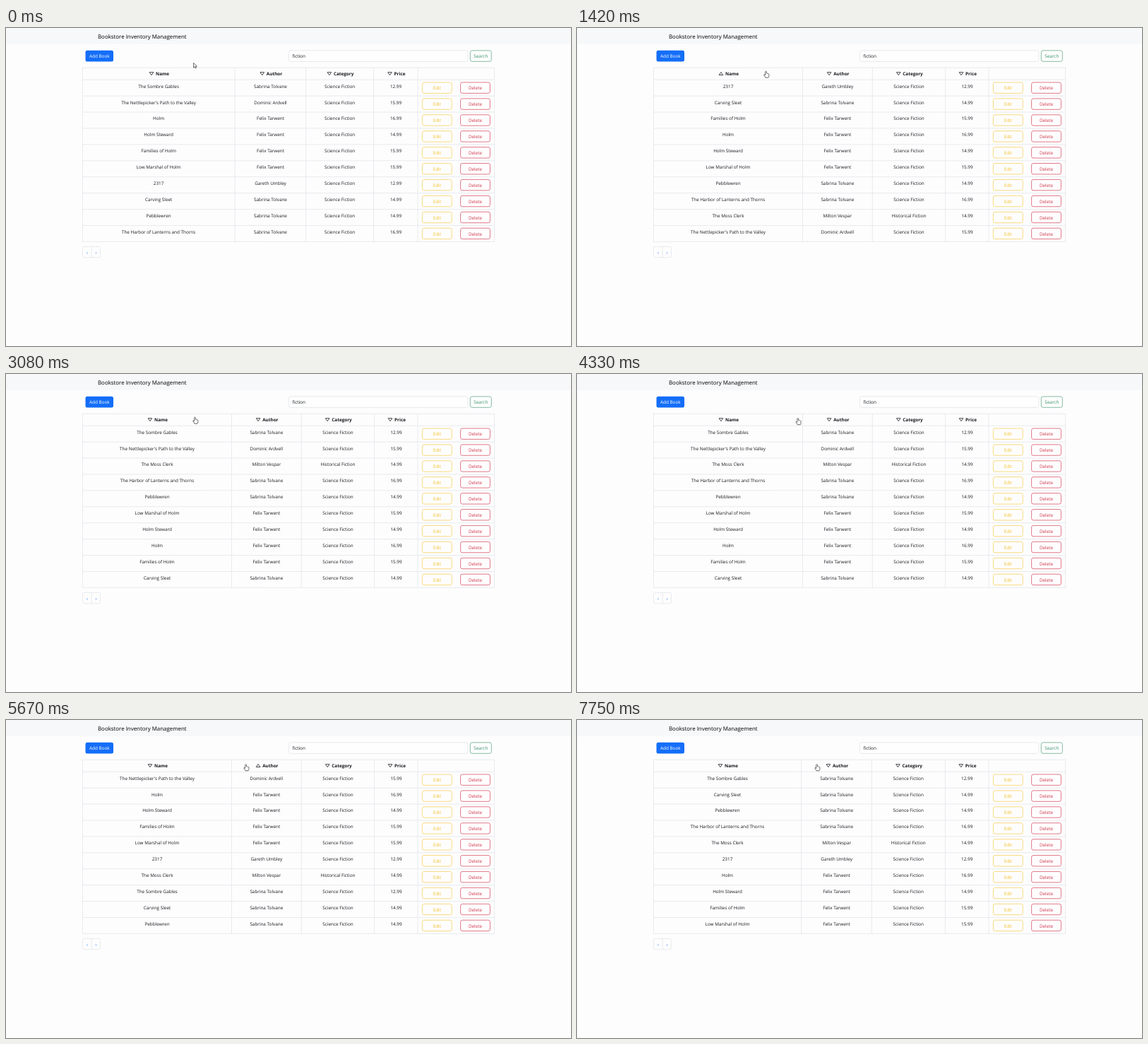
Recreate the animation shown at these times as an HTML page with a canvas. Size 800x450 px, loop 8 s.

```html
<!DOCTYPE html>
<html lang="en">
<head>
<meta charset="utf-8">
<title>Bookstore Inventory Management</title>
<style>
html, body { margin: 0; width: 100%; height: 100%; overflow: hidden; background: #fefdfe; }
canvas { display: block; width: 800px; height: 450px; }
</style>
</head>
<body>
<canvas id="stage"></canvas>
<script>
const LOOP = 8000;
const INK = '#16191d', LINE = '#e5e8eb', BLUE = '#146ef8';
const FONT = '"Open Sans", "Noto Sans", sans-serif';
const canvas = document.getElementById('stage');
const ctx = canvas.getContext('2d');
const dpr = window.devicePixelRatio || 1;
canvas.width = 800 * dpr;
canvas.height = 450 * dpr;
ctx.textRendering = 'geometricPrecision';

const SCI = 'Science Fiction';
const books = [
  ['The Sombre Gables', 'Sabrina Tolvane', SCI, '12.99'],
  ["The Nettlepicker's Path to the Valley", 'Dominic Ardvell', SCI, '15.99'],
  ['Holm', 'Felix Tarwent', SCI, '16.99'],
  ['Holm Steward', 'Felix Tarwent', SCI, '14.99'],
  ['Families of Holm', 'Felix Tarwent', SCI, '15.99'],
  ['Low Marshal of Holm', 'Felix Tarwent', SCI, '15.99'],
  ['2317', 'Gareth Umbley', SCI, '12.99'],
  ['Carving Sleet', 'Sabrina Tolvane', SCI, '14.99'],
  ['Pebblewren', 'Sabrina Tolvane', SCI, '14.99'],
  ['The Harbor of Lanterns and Thorns', 'Sabrina Tolvane', SCI, '16.99'],
  ['The Moss Clerk', 'Milton Vespar', 'Historical Fiction', '14.99']
];

function sorted(col, dir) {
  return [...books].sort((a, b) => a[col] === b[col] ? 0 : (a[col] < b[col] ? -dir : dir));
}

// Column edges and centres
const wide = { edges: [324, 424.5, 520.5], mids: [216.1, 374.5, 472.6, 552] };
const mid = { edges: [319.5, 418.3, 521.6], mids: [214, 368.8, 470, 552.5] };
const slim = { edges: [317.6, 417.3, 521.4], mids: [213, 367.6, 469.2, 552.2] };

const tables = [
  { at: 0, rows: books, layout: wide },
  { at: 1420, rows: sorted(0, 1), layout: mid },
  { at: 3080, rows: sorted(0, -1), layout: mid },
  { at: 5420, rows: sorted(1, 1), layout: mid },
  { at: 7750, rows: sorted(1, -1), layout: slim }
];

const moves = [
  { at: 0, x: 265.6, y: 49.4 },
  { at: 420, x: 266.2, y: 52.5 },
  { at: 500, x: 267, y: 59.5 },
  { at: 580, x: 267.5, y: 60.9 },
  { at: 4170, x: 273, y: 61 },
  { at: 4250, x: 292, y: 61.8 },
  { at: 4330, x: 312.8, y: 62.4 },
  { at: 4420, x: 326, y: 62.5 },
  { at: 4500, x: 334, y: 62.5 },
  { at: 4580, x: 338, y: 62.5 },
  { at: 4670, x: 339.6, y: 62.5 }
];

const latest = (list, t) => list.filter(s => s.at <= t).pop();

function text(str, x, y, color = INK, size = 6.35, align = 'center', weight = 400) {
  ctx.font = `${weight} ${size}px ${FONT}`;
  ctx.textAlign = align;
  ctx.fillStyle = color;
  ctx.fillText(str, x, y);
}

function box(x, y, w, h, stroke, fill, r = 2.5) {
  ctx.beginPath();
  ctx.roundRect(x, y, w, h, r);
  if (fill) { ctx.fillStyle = fill; ctx.fill(); }
  if (stroke) { ctx.strokeStyle = stroke; ctx.lineWidth = 0.9; ctx.stroke(); }
}

function line(x1, y1, x2, y2) {
  ctx.beginPath();
  ctx.moveTo(x1, y1);
  ctx.lineTo(x2, y2);
  ctx.strokeStyle = LINE;
  ctx.lineWidth = 0.9;
  ctx.stroke();
}

function caret(x, up) {
  const base = up ? 66.5 : 62.7, tip = up ? 62.5 : 66.7;
  ctx.beginPath();
  ctx.moveTo(x - 2.8, base);
  ctx.lineTo(x + 2.8, base);
  ctx.lineTo(x, tip);
  ctx.closePath();
  ctx.lineJoin = 'round';
  ctx.lineWidth = 0.8;
  ctx.strokeStyle = INK;
  ctx.stroke();
}

const arrow = new Path2D('M0 0V6.7L1.6 5.3 2.7 7.6 3.7 7.1 2.7 4.9H4.8Z');
const hand = new Path2D('M-.9 .8Q0 -.5 .9 .8V3.3Q1.7 2.8 2.1 3.6Q2.9 3.2 3.2 4Q4.2 3.7 4.3 4.8' +
  'V6.6Q4.2 8 3.4 9.3H-.6Q-1.3 7.8 -2.8 5.9Q-2.8 4.6 -1.6 5.2L-.9 5.9Z');

function cursor({ x, y }) {
  ctx.save();
  ctx.translate(x, y);
  const shape = y > 56 ? hand : arrow;
  ctx.fillStyle = '#fff';
  ctx.fill(shape);
  ctx.strokeStyle = '#3a3a3c';
  ctx.lineWidth = 0.75;
  ctx.lineJoin = 'round';
  ctx.stroke(shape);
  ctx.restore();
}

function toolbar() {
  ctx.fillStyle = '#f7f8f9';
  ctx.fillRect(0, 0, 800, 23.2);
  text('Bookstore Inventory Management', 130, 15.2, '#000', 7.9, 'left');
  box(112.5, 31.7, 39.5, 15.8, null, BLUE);
  text('Add Book', 132.3, 42.4, '#fff');
  box(400.4, 31.8, 253.4, 15.6, LINE, '#fefefe');
  text('fiction', 405.5, 42.4, INK, 6.35, 'left');
  box(657.3, 31.9, 30, 15.4, '#78b596');
  text('Search', 672.3, 42.4, '#369069');
}

function table({ rows, layout }, t) {
  const top = 73.2, step = 22.917, bottom = top + step * 10;
  line(108, 56.2, 692, 56.2);
  for (let i = 0; i <= 10; i++) line(108, top + i * step, 692, top + i * step);
  for (const x of [108.5, ...layout.edges, 583.1, 691.5]) line(x, 56, x, bottom);

  const up = [t >= 1250 && t < 3000, t >= 5330 && t < 7670];
  ['Name', 'Author', 'Category', 'Price'].forEach((label, i) => {
    const x = layout.mids[i] + 5.5;
    text(label, x, 67.4, INK, 6.35, 'center', 700);
    caret(x - ctx.measureText(label).width / 2 - 6.1, up[i]);
  });

  rows.slice(0, 10).forEach((row, i) => {
    const y = top + i * step;
    row.forEach((cell, c) => text(cell, layout.mids[c], y + 11.4));
    box(589.4, y + 3.75, 41.8, 15.4, '#f7d672');
    text('Edit', 610.3, y + 14.2, '#f1bf22');
    box(643.6, y + 3.75, 41.8, 15.4, '#dd6b7b');
    text('Delete', 664.5, y + 14.2, '#cf3448');
  });
}

function pager() {
  box(108.5, 309.3, 25, 15.5, LINE);
  line(121.2, 309.3, 121.2, 324.8);
  text('‹', 115, 320, BLUE);
  text('›', 127.5, 320, BLUE);
}

function draw(t) {
  ctx.setTransform(dpr, 0, 0, dpr, 0, 0);
  ctx.fillStyle = '#fefdfe';
  ctx.fillRect(0, 0, 800, 450);
  toolbar();
  table(latest(tables, t), t);
  pager();
  cursor(latest(moves, t));
}

const start = performance.now();
function tick() {
  draw((performance.now() - start) % LOOP);
  requestAnimationFrame(tick);
}
tick();
</script>
</body>
</html>
```
